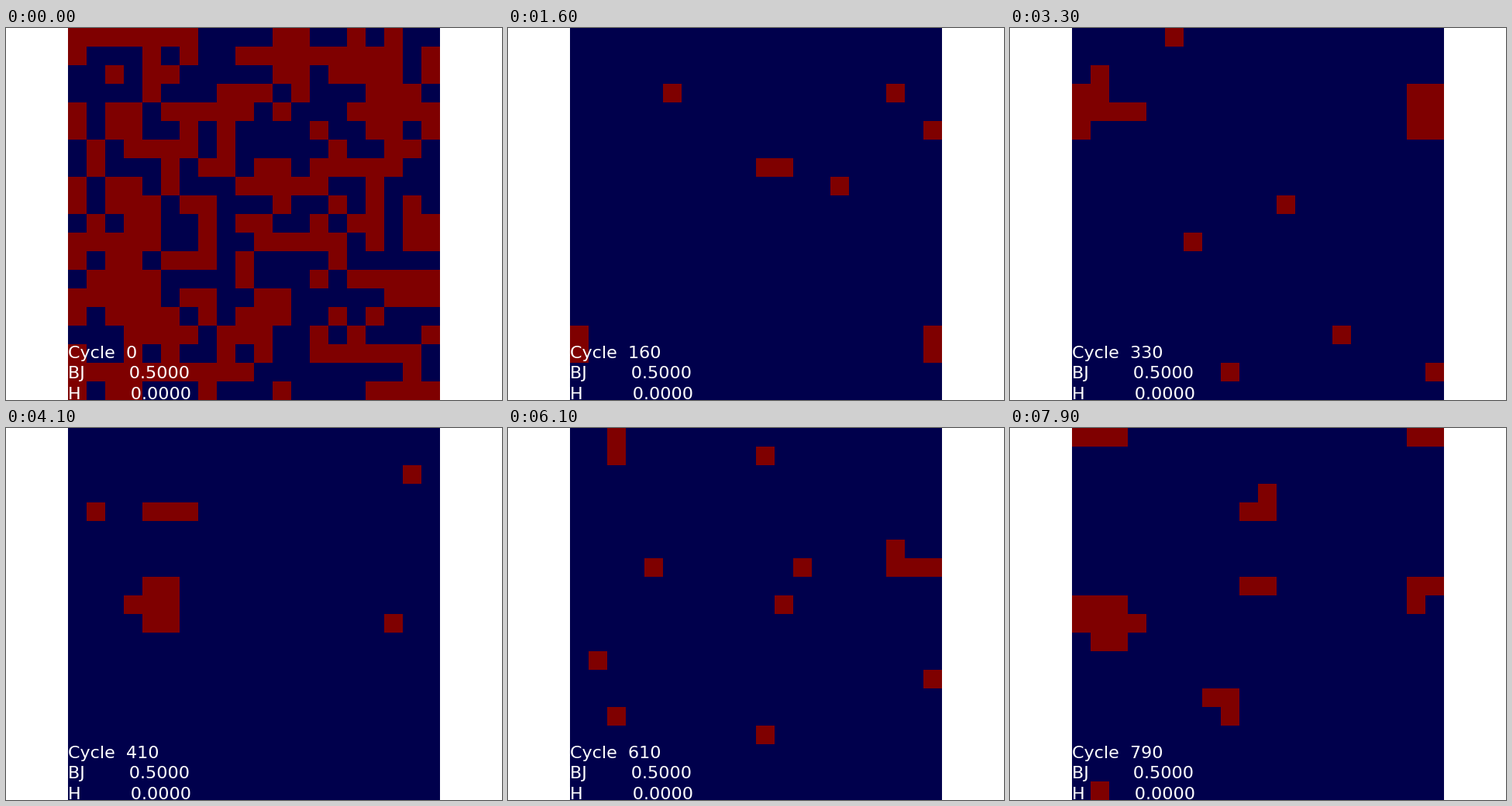
These frames come from a looping animation (640x480 px, 8 s). A matplotlib script:

```python
import numpy as np
import matplotlib.pyplot as plt
from matplotlib.animation import FuncAnimation

# 2D Ising model on a periodic lattice, Metropolis dynamics
N = 20
FRAMES = 80
SWEEPS = 10  # cycles per frame
BJ, H = 0.5, 0.0
SETTLE = 16  # frames in which a slight bias steers the domains to spin-down
BIAS = -0.05

rng = np.random.default_rng(7)
parity = np.indices((N, N)).sum(axis=0) % 2


def sweep(s, field):
    """One Metropolis pass, one checkerboard colour after the other."""
    for p in (0, 1):
        near = sum(np.roll(s, d, axis) for d in (1, -1) for axis in (0, 1))
        cost = 2 * s * (BJ * near + field)
        flip = (parity == p) & (rng.random((N, N)) < np.exp(-cost))
        s = np.where(flip, -s, s)
    return s


def run():
    s = rng.choice([-1, 1], size=(N, N))
    states = [s]
    for i in range(1, FRAMES):
        field = H + (BIAS if i < SETTLE else 0)
        for _ in range(SWEEPS):
            s = sweep(s, field)
        states.append(s)
    return states


states = run()

fig = plt.figure(figsize=(6.4, 4.8), dpi=100, facecolor="white")
ax = fig.add_axes([0.125, 0, 0.75, 1])
ax.axis("off")
img = ax.imshow(states[0], cmap="seismic", vmin=-1, vmax=1,
                interpolation="nearest", aspect="auto")


def label(y, text):
    return fig.text(80 / 640, y / 480, text, color="white", fontsize=16,
                    family="DejaVu Sans", va="baseline")


cycle = label(54, "Cycle  0")
label(28, f"BJ        {BJ:.4f}")
label(1, f"H         {H:.4f}")


def update(i):
    img.set_data(states[i])
    cycle.set_text(f"Cycle  {i * SWEEPS}")
    return img, cycle


anim = FuncAnimation(fig, update, frames=FRAMES, interval=100,
                     repeat=True, repeat_delay=0, blit=False)
plt.show()
```
